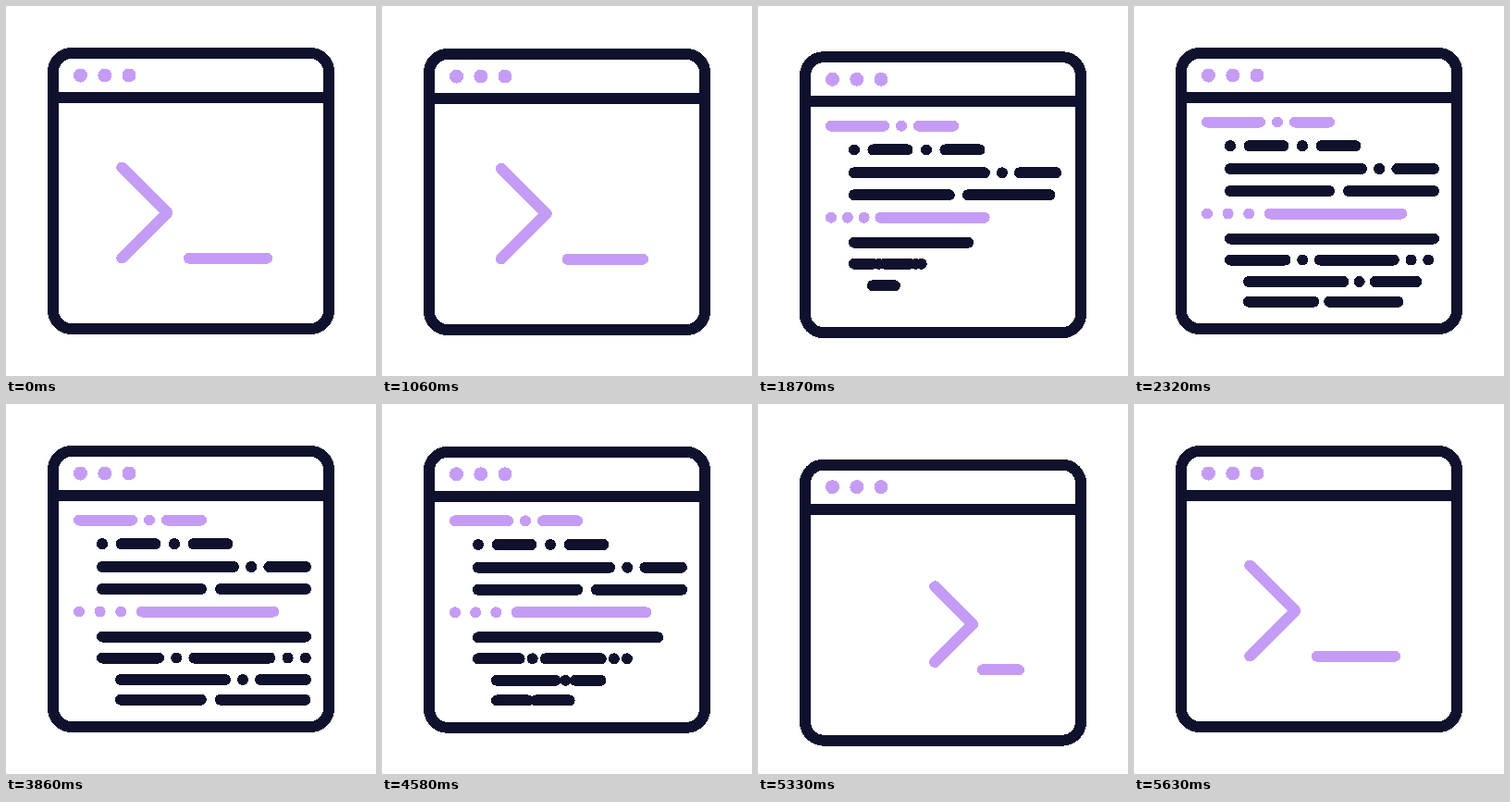
Recreate the animation shown at these times as an HTML page. Size 400 by 400 pixels, loop 5660 ms.

```html
<!DOCTYPE html>
<html lang="en">
<head>
<meta charset="utf-8">
<title>Terminal to code</title>
<style>
  html, body { margin: 0; width: 100%; height: 100%; overflow: hidden; background: #fff; }
  svg { display: block; width: 100%; height: 100%; }
  path, rect { fill: none; stroke-linecap: round; stroke-linejoin: round; shape-rendering: crispEdges; }
</style>
</head>
<body>
<svg viewBox="0 0 400 400">
  <g id="win">
    <g id="code" stroke-width="12"></g>
    <g id="prompt" stroke="#c59cf5" stroke-width="12">
      <path id="chevron"/>
      <path id="cursor"/>
    </g>
    <g stroke="#0f112d" stroke-width="12">
      <rect x="51" y="51" width="298" height="298" rx="20"/>
      <path d="M51 99H349"/>
    </g>
    <path d="M80.5 75h0M106.8 75h0M133 75h0" stroke="#c59cf5" stroke-width="15"/>
  </g>
</svg>
<script>
const LOOP = 5660;
const MIRROR = 6630; // closing is the opening played backwards
const DARK = '#0f112d', LILAC = '#c59cf5';
const MARGIN = 79, INDENT = 104, DEEP = 124;
const $ = id => document.getElementById(id);

const clamp = v => Math.min(1, Math.max(0, v));
const part = (t, start, span) => clamp((t - start) / span);
const smooth = u => u * u * (3 - 2 * u);
const easeOut = u => 1 - (1 - u) ** 3;

// Each line of code: y, left edge, gap between words, word lengths (0 is a dot)
const rows = [
  [125.5, MARGIN, 19, 57, 0, 37],
  [151.2, INDENT, 20.5, 0, 37, 0, 37],
  [176, INDENT, 19.2, 142, 0, 39.5],
  [200, INDENT, 21, 107, 92],
  [224.5, MARGIN, 22.6, 0, 0, 0, 142.5],
  [251.5, INDENT, 0, 220],
  [274.5, INDENT, 19.2, 61, 0, 82, 0, 0],
  [298, DEEP, 19, 113, 0, 49],
  [319.7, DEEP, 21, 87, 92]
].map(([y, left, gap, ...words], i) => {
  const el = document.createElementNS('http://www.w3.org/2000/svg', 'path');
  el.setAttribute('stroke', left === MARGIN ? LILAC : DARK);
  $('code').append(el);
  // one line every 60 ms; later lines unroll more slowly
  return { el, y, left, gap, words, start: 1414 + 60 * i, span: 420 + 118 * Math.max(0, i - 3) };
});

function drawRow({ el, y, left, gap, words, start, span }, t) {
  const u = part(t, start, span), scale = easeOut(u);
  let x = left, d = '';
  for (const word of words) {
    d += `M${x} ${y}h${word * scale}`;
    x += (word + gap) * scale;
  }
  el.setAttribute('d', d);
  el.style.display = u > 0 ? '' : 'none';
}

// cubic-bezier(x1, 0, x2, 1)
function bezier(u, x1, x2) {
  let lo = 0, hi = 1;
  for (let i = 0; i < 24; i++) {
    const m = (lo + hi) / 2, n = 1 - m;
    if (3 * n * n * m * x1 + 3 * n * m * m * x2 + m ** 3 < u) lo = m; else hi = m;
  }
  return smooth(lo);
}

function drop(t) {
  const down = smooth(part(t, 1000, 425));
  const up = bezier(part(t, 1425, 780), .33, .4);
  return 18.6 * (down - up);
}

function drawPrompt(t) {
  const u = part(t, 1000, 570), slide = smooth(u);
  const tip = 174.3 + (282 - 174.3) * slide;
  const arm = 49 * (1 - u ** 2.8);
  $('prompt').style.display = u < 1 ? '' : 'none';
  $('chevron').setAttribute('d',
    `M${tip - arm} ${223.5 - arm}L${tip} 223.5L${tip - arm} ${223.5 + arm}`);
  $('cursor').setAttribute('d', `M${197.8 + 84.2 * slide} 272.7H282`);
}

function render(time) {
  const t = Math.min(time, MIRROR - time);
  $('win').setAttribute('transform', `translate(0 ${drop(t)})`);
  drawPrompt(t);
  rows.forEach(row => drawRow(row, t));
}

const begin = performance.now();
function tick() {
  render((performance.now() - begin) % LOOP);
  requestAnimationFrame(tick);
}
tick();
</script>
</body>
</html>
```
